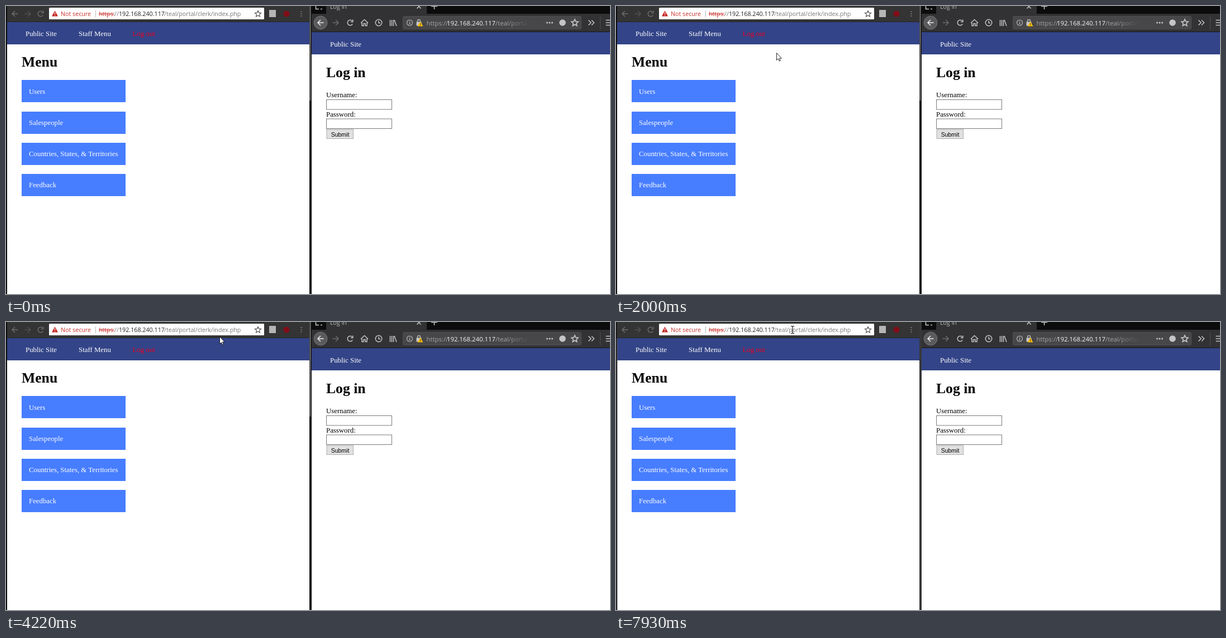
An HTML page that plays this animation: 1081 px wide and 518 px high, repeating every 8 s.

```html
<!DOCTYPE html>
<html lang="en">
<head>
<meta charset="utf-8">
<title>Two browser windows</title>
<style>
  html, body { margin: 0; width: 100%; height: 100%; overflow: hidden; background: #fff; }
  svg { display: block; width: 1081px; height: 518px; }
  .serif { font: 12.84px "Liberation Serif", "Times New Roman", serif; }
  .title { font: bold 25.68px "Liberation Serif", "Times New Roman", serif; }
  .ui { font: 10.7px "Open Sans", "Noto Sans", sans-serif; }
  .wide { font-size: 11.36px; }
  .control { font: 10.5px "Liberation Sans", Arial, sans-serif; }
  .line { fill: none; stroke-width: 1.5; }
</style>
</head>
<body>
<svg viewBox="0 0 1081 518">
  <defs>
    <linearGradient id="fade" gradientUnits="userSpaceOnUse" x1="895" x2="936">
      <stop stop-color="#a5a5a7"/>
      <stop offset="1" stop-color="#a5a5a7" stop-opacity="0"/>
    </linearGradient>
    <path id="star" d="M0-5.5 1.6-1.9 5.5-1.5 2.6 1.1 3.4 5 0 3-3.4 5-2.6 1.1-5.5-1.5-1.6-1.9Z"/>
    <path id="arrowLeft" d="M5.5 0H-5M0-5-5 0 0 5"/>
    <path id="reload" d="M4.2 2.4A4.8 4.8 0 1 1 3.6-3.2M4.8-5.5V-1.6H.9"/>
  </defs>

  <rect width="1081" height="518" fill="#fff"/>

  <!-- Left window -->
  <rect x="2" width="541" height="29" fill="#343435"/>
  <rect x="2" y="28" width="541" height="1" fill="#272728"/>
  <g class="line" stroke="#6c6c6c">
    <use href="#arrowLeft" x="16" y="14"/>
    <use href="#arrowLeft" transform="translate(39 14) scale(-1 1)" stroke="#515151"/>
    <use href="#reload" x="62" y="14"/>
  </g>
  <rect x="77" y="3" width="385" height="21" rx="1.5" fill="#fff"/>
  <path d="M87.500 8.500 93 18.500H82Z" fill="#c5221f"/>
  <path d="M87.500 11.500V15M87.500 16V17.300" stroke="#fff" stroke-width="1.200"/>
  <path d="M160.500 8V20" stroke="#b9b9b9"/>
  <g class="ui">
    <text x="98" y="18" fill="#c9302c">Not secure</text>
    <text x="166" y="18" fill="#c9302c">https:</text>
    <text x="194" y="18" fill="#777">//</text>
    <text x="202" y="18" fill="#222">192.168.240.117</text>
    <text x="283" y="18" fill="#777">/teal/portal/clerk/index.php</text>
  </g>
  <path d="M166 14.500H193" stroke="#c9302c"/>
  <use href="#star" x="451" y="14" class="line" stroke="#555" style="stroke-width:1.2"/>
  <rect x="471" y="7" width="12" height="13" fill="#b5b5b5"/>
  <rect id="extensionHover" x="497" y="6" width="12" height="17" fill="#29292a"/>
  <circle cx="502" cy="14" r="5.500" fill="#800d18"/>
  <path d="M528.500 9V11M528.500 13V15M528.500 17V19" stroke="#747474" stroke-width="2"/>

  <rect x="2" y="29" width="541" height="40" fill="#334488"/>
  <g class="serif" fill="#fff">
    <text x="35" y="54">Public Site</text>
    <text x="130" y="54">Staff Menu</text>
    <text x="226.500" y="54" fill="#f00020">Log out</text>
    <g id="menu"></g>
  </g>
  <text class="title" x="28" y="109">Menu</text>

  <!-- Window edges -->
  <g id="inactiveEdge">
    <path d="M1 0V518" stroke="#0c0c0d" stroke-width="2"/>
    <path d="M545 0V518" stroke="#0c0c0d" stroke-width="4"/>
    <path d="M544.500 0V170" stroke="#777" stroke-width="2"/>
  </g>
  <g id="activeEdge">
    <path d="M1 0V518" stroke="#17171a" stroke-width="2"/>
    <path d="M2 29V518" stroke="#55565a"/>
    <path d="M545 0V518" stroke="#38383b" stroke-width="4"/>
  </g>

  <!-- Right window -->
  <rect x="547" width="534" height="14" fill="#0c0c0d"/>
  <rect x="573" width="180" height="14" fill="#323234"/>
  <rect x="547" y="14" width="534" height="33" fill="#323234"/>
  <rect x="547" y="46" width="534" height="1" fill="#171719"/>
  <text class="ui" x="580" y="4.500" fill="#b8b8ba">Log in</text>
  <g class="line" stroke="#c5c5c7">
    <path d="M554.500 0V5.500H560M563 5.500H566M735.500-3 742.500 4.500M742.500-3 735.500 4.500M761 .5H772M766.500-5V6"/>
    <circle cx="563" cy="30" r="12" fill="#5b5b5e" stroke="#737375" style="stroke-width:1"/>
    <use href="#arrowLeft" x="563" y="30" stroke="#eee"/>
    <use href="#arrowLeft" transform="translate(590 30) scale(-1 1)" stroke="#6b6b6e"/>
    <use href="#reload" x="616" y="30"/>
    <path d="M635 30.500 641.500 24.500 648 30.500M637 30V35.500H640V31.500H643V35.500H646V30"/>
    <circle cx="667" cy="30" r="5.700"/>
    <path d="M667 26.500V30.500H670"/>
    <path d="M687.500 25V36M690.500 25V36M693.500 25V36M695 25 699 36"/>
  </g>
  <rect x="710.500" y="18.500" width="319" height="23" rx="2" fill="#474749" stroke="#505052"/>
  <g class="line" stroke="#b5b5b7">
    <circle cx="722.500" cy="30" r="5" style="stroke-width:1.2"/>
    <path d="M722.500 29V33M722.500 26.700V28"/>
    <path d="M736.500 29V27A2.500 2.500 0 0 1 741.500 27V29"/>
  </g>
  <rect x="734.500" y="28.500" width="9" height="7" fill="#c5c5c7"/>
  <path d="M741.500 28 746.500 36.500H736.500Z" fill="#ffbf00"/>
  <path d="M741.500 31V33.500M741.500 34.300V35.500" stroke="#333"/>
  <g class="ui wide">
    <text class="ui wide" x="752.500" y="34.500" fill="#a5a5a7">https://</text>
    <text class="ui wide" x="789" y="34.500" fill="#f5f5f5">192.168.240.117</text>
    <text class="ui wide" x="876" y="34.500" fill="url(#fade)">/teal/portal/</text>
  </g>
  <g fill="#c5c5c7">
    <circle cx="968.500" cy="30" r="1.500"/>
    <circle cx="973" cy="30" r="1.500"/>
    <circle cx="977.500" cy="30" r="1.500"/>
    <circle cx="996" cy="30" r="5.800"/>
  </g>
  <g class="line" stroke="#c5c5c7">
    <use href="#star" transform="translate(1018 30) scale(1.1)"/>
    <path d="M1042.500 25.500 1047 30 1042.500 34.500M1048 25.500 1052.500 30 1048 34.500"/>
    <path d="M1073.500 25.500H1081M1073.500 30H1081M1073.500 34.500H1081"/>
    <path d="M1063.500 19V42" stroke="#505052" style="stroke-width:1"/>
  </g>

  <rect x="547" y="47" width="534" height="40" fill="#334488"/>
  <text class="serif" x="580" y="73" fill="#fff">Public Site</text>
  <text class="title" x="573" y="128">Log in</text>
  <g class="serif">
    <text x="573" y="164">Username:</text>
    <text x="573" y="199">Password:</text>
  </g>
  <g fill="#fff" stroke="#7a7a7a">
    <rect x="573.500" y="168.500" width="117" height="17.500"/>
    <rect x="573.500" y="203" width="117" height="17.500"/>
    <rect x="574" y="222" width="47.500" height="16.500" fill="#e1e1e1" stroke="#adadad"/>
  </g>
  <text class="control" x="598" y="234.500" text-anchor="middle">Submit</text>

  <!-- Pointers, each with its hot spot at 0,0 -->
  <path id="arrow" d="M.5 .5V13.500L3.400 10.800 5.300 15.200 7.300 14.300 5.400 10.100H9.300Z" fill="#fff" stroke="#111" stroke-width=".9"/>
  <path id="beam" d="M-3-6.500H-1L0-5.500 1-6.500H3M0-5.500V5.500M-3 6.500H-1L0 5.500 1 6.500H3" fill="none" stroke="#111" stroke-width="1.100"/>
</svg>

<script>
const LOOP = 8000;
const byId = id => document.getElementById(id);
const show = (element, visible) => element.style.display = visible ? "" : "none";

byId("menu").innerHTML = ["Users", "Salespeople", "Countries, States, &amp; Territories", "Feedback"]
  .map((label, i) => {
    const top = 133.3 + i * 56.2;
    return `<rect x="28" y="${Math.round(top)}" width="186" height="40" fill="#477dff"/>
      <text x="41" y="${top + 24.5}">${label}</text>`;
  }).join("");

// The pointer holds each pose until the next: time, shape, x, y
const poses = [
  [0],
  [870, "arrow", 229, 384],
  [1150, "arrow", 226, 350],
  [1290, "arrow", 222, 310],
  [1440, "arrow", 224, 280],
  [1590, "arrow", 227, 250],
  [1730, "arrow", 231, 222],
  [1870, "arrow", 262, 150],
  [2000, "arrow", 287, 84],
  [2160, "arrow", 290, 29],
  [2300, "beam", 322, 18],
  [2430, "beam", 376, 18],
  [2570, "beam", 440, 18],
  [2710, "arrow", 498, 13],
  [2850],
  [2970, "arrow", 690, 240],
  [3110, "arrow", 773, 292],
  [3250, "beam", 621, 165],
  [3400],
  [3830, "arrow", 480, 29],
  [3970, "arrow", 448, 29],
  [4100, "arrow", 410, 28],
  [4220, "arrow", 382, 26],
  [4340, "beam", 356, 18],
  [4480, "beam", 338, 15],
  [4620, "beam", 328, 13],
  [4760, "beam", 325, 13],
  [5890, "beam", 322, 13],
  [6330, "beam", 319, 13],
  [6460, "beam", 340, 13],
  [6590, "beam", 366, 13],
  [6720, "beam", 348, 13],
  [6850, "beam", 312, 13],
  [6980, "beam", 291, 13],
  [7110, "beam", 304, 13],
  [7240, "beam", 318, 14],
  [7380, "beam", 324, 15],
  [7520, "beam", 320, 14],
  [7660, "beam", 317, 14],
  [7930, "beam", 316, 14]
];
const LEFT_FOCUS = 5160;

function draw() {
  const time = performance.now() % LOOP;
  const [, shape, x, y] = poses.findLast(pose => pose[0] <= time);
  for (const name of ["arrow", "beam"]) {
    show(byId(name), name === shape);
    if (name === shape) byId(name).setAttribute("transform", `translate(${x} ${y})`);
  }
  show(byId("extensionHover"), time >= 2850 && time < 2970);
  show(byId("inactiveEdge"), time < LEFT_FOCUS);
  show(byId("activeEdge"), time >= LEFT_FOCUS);
  requestAnimationFrame(draw);
}
draw();
</script>
</body>
</html>
```
